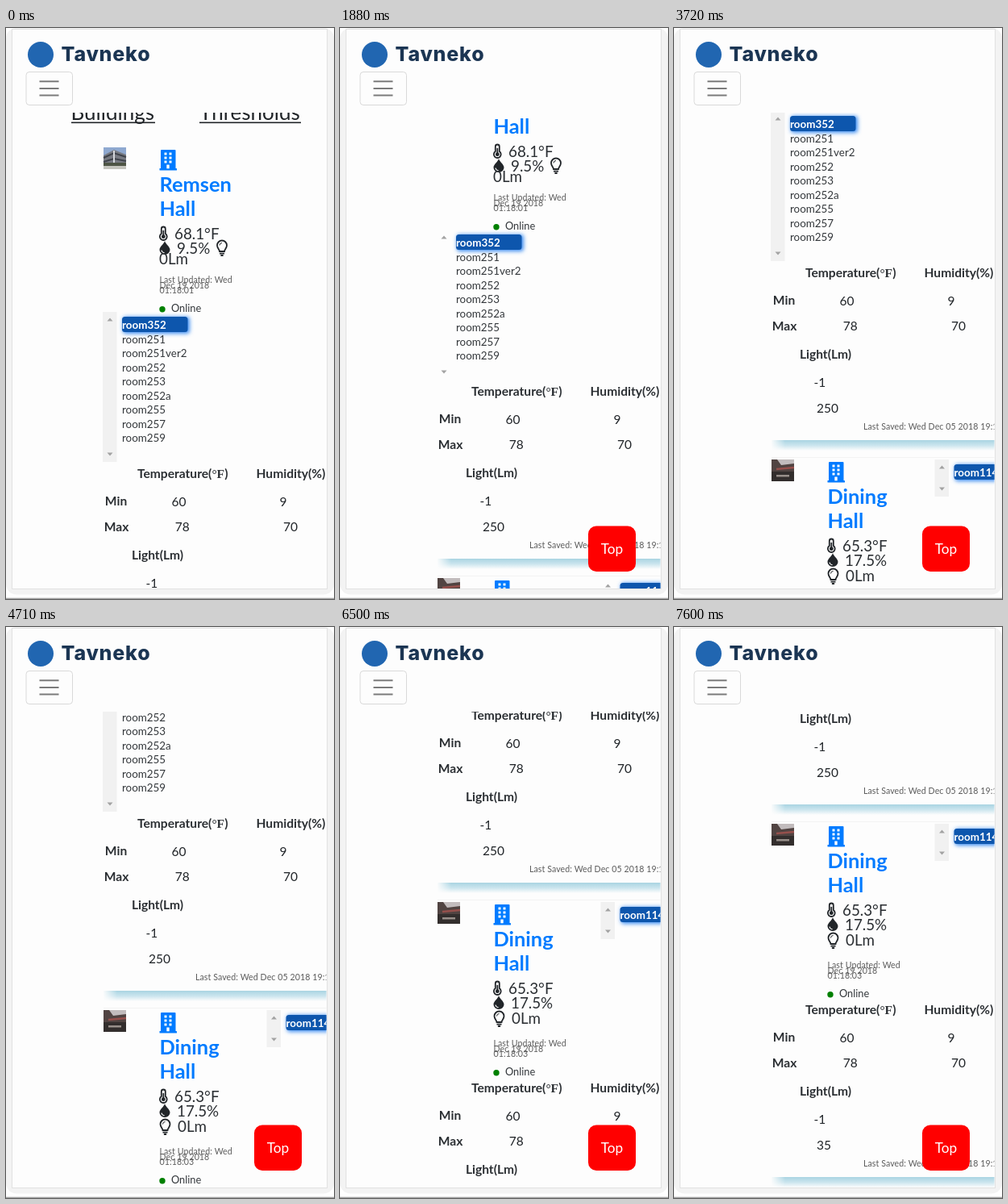
Animation, 407 px wide and 708 px high, one loop 8 s. Source, as an HTML page:

```html
<!DOCTYPE html>
<html lang="en">
<head>
<meta charset="utf-8">
<title>Building monitor</title>
<style>
  html, body { margin: 0; width: 100%; height: 100%; overflow: hidden; background: #fff; }
  svg { display: block; width: 100vw; height: 100vh; }
  text { font-family: Lato, sans-serif; font-size: 15.5px; fill: #212529; white-space: pre; }
  .b { font-weight: 700; font-size: 15.6px; fill: #2b2f33; }
  .mid { text-anchor: middle; }
  .head { font-size: 26px; }
  .title { font-size: 25.4px; font-weight: 700; fill: #007bff; }
  .read { font-size: 18.8px; fill: #2b2f33; }
  .note { font-size: 10.6px; letter-spacing: .08px; fill: #5c5c5c; }
  .state { font-size: 12.8px; fill: #33373b; }
  .opt { font-size: 13.4px; fill: #33373b; }
  .picked { font-weight: 700; fill: #fff; }
  .brand { font: 800 25px Inter, sans-serif; letter-spacing: .8px; fill: #1b3553; }
  .button { font-size: 17.2px; fill: #fff; }
  .serif { font-family: "Liberation Serif", serif; }
  .line { fill: none; stroke: #212529; stroke-width: 1.8; }
</style>
</head>
<body>
<svg id="stage" viewBox="0 0 407 708" preserveAspectRatio="none"></svg>
<script>
const LOOP = 8000;
const NOTCH = 41.5;

// One wheel notch each: start, end, and how far it has moved in between
const notches = [
  [500, 650, .45], [1210, 1350, .47], [1880, 2030, .45], [2460, 2590, .45],
  [2890, 3010, .45], [3720, 3720, 0], [4280, 4430, .45], [4710, 4860, .45],
  [5420, 5540, .22], [5940, 6070, .45], [6500, 6650, .67], [6930, 7060, .45],
  [7460, 7600, .45]
];

const rect = (x, y, w, h, fill, extra = '') =>
  `<rect x="${x}" y="${y}" width="${w}" height="${h}" fill="${fill}" ${extra}/>`;
const text = (x, y, str, cls = '') => `<text x="${x}" y="${y}" class="${cls}">${str}</text>`;
const path = (d, attrs) => `<path d="${d}" ${attrs}/>`;
const move = (x, y, body) => `<g transform="translate(${x} ${y})">${body}</g>`;

const buildingIcon = () => {
  let holes = '';
  for (const y of [154.5, 159.5, 164.5])
    for (const x of [196.5, 202.5]) holes += rect(x, y, 3, 3, '#fff');
  return rect(192, 151, 18.5, 24, '#007bff', 'rx="1"') +
    rect(190.5, 174, 21.5, 2.5, '#007bff', 'rx=".6"') +
    holes + rect(199.3, 169.5, 3.4, 4.8, '#fff');
};

const thermometer = () =>
  path('M192.8 255V249a2.5 2.5 0 0 1 5 0V255a4.4 4.4 0 1 1-5 0Z', 'class="line"') +
  path('M195.3 251V258', 'class="line"') +
  '<circle cx="195.3" cy="258.7" r="2.4" fill="#212529"/>';

const drop = () =>
  path('M197 264c1 4 6.5 7 6.5 11a6.5 6 0 0 1-13 0c0-4 5.5-7 6.5-11z', 'fill="#212529"') +
  path('M193 275.5a4 3.6 0 0 0 3.6 3.2', 'fill="none" stroke="#fff" stroke-width="1.1"');

const bulb = () =>
  path('M265 277c0-2.5-3-4-3-7.5a6 6 0 0 1 12 0c0 3.5-3 5-3 7.5z', 'class="line"') +
  path('M265 279.6h6M266.4 282h3.2', 'class="line"') +
  path('M265 269.5a3 3 0 0 1 3-3', 'class="line" style="stroke-width:1"');

const dayPhoto = () =>
  rect(121, 148, 28, 27, '#8fa9d0') +
  path('M121 158L134 151L149 157V169H121Z', 'fill="#777a82"') +
  path('M121 161L134 155L149 160M121 166L134 162L149 165', 'fill="none" stroke="#3f434b" stroke-width="2"') +
  path('M134 152V167', 'stroke="#d5d8dc" stroke-width="2"') +
  rect(121, 167, 28, 4, '#4e5545') + rect(121, 171, 28, 4, '#c4c4bd');

const duskPhoto = () =>
  rect(121, 148, 28, 27, '#c2bcbd') +
  path('M121 148H128L133 155L149 153V166H121Z', 'fill="#514442"') +
  path('M127 160L149 158', 'stroke="#96504c" stroke-width="2.5"') +
  rect(121, 163, 28, 12, '#332e2d') + rect(127, 167, 16, 2.5, '#988f8a');

const arrows = (x, top, bottom) =>
  path(`M${x - 3.5} ${top + 2}h7l-3.5-4zM${x - 3.5} ${bottom - 2}h7l-3.5 4z`, 'fill="#a3a3a3"');

const select = (x, y, h, w, options) => {
  const left = x + 24;
  const base = y + 21;
  return rect(x, y, 17.5, h, '#f1f1f1', 'class="track"') +
    arrows(x + 9, y + 9.5, y + h - 9.5) +
    rect(left + 1, y + 6, w + 1, 21, '#3f8ff2', 'rx="4" filter="url(#glow)"') +
    rect(left, y + 6, w - .5, 19, '#0d56ad', 'rx="3.5"') +
    options.map((o, i) =>
      text(left, Math.round(base + i * 17.5), o, i ? 'opt' : 'opt picked')).join('');
};

const rule = y =>
  rect(121, y, 290, 13, 'url(#fall)') + rect(120, y, 18, 13, 'url(#fade)') +
  rect(121, y + 21, 290, 1, '#f3f3f3');

const limits = light =>
  text(163, 557.5, 'Temperature(<tspan class="serif">°F</tspan>)', 'b') +
  text(310.5, 557.5, 'Humidity(%)', 'b') +
  text(136.5, 592, 'Min', 'b mid') + text(214.5, 593, '60', 'mid') + text(344, 593, '9', 'mid') +
  text(137, 624, 'Max', 'b mid') + text(218.7, 624, '78', 'mid') + text(353, 624, '70', 'mid') +
  text(188, 659, 'Light(Lm)', 'b mid') +
  text(173.5, 694, '-1') + text(177, 726, light) +
  text(235, 747, 'Last Saved: Wed Dec 05 2018 19:18:01', 'note') +
  rule(760);

const heading = (photo, name, temp, wet) =>
  photo() + buildingIcon() +
  text(190.5, 203, name, 'title') + text(190.5, 233, 'Hall', 'title') +
  thermometer() + text(209, 262, temp, 'read') +
  drop() + text(212, 280, wet, 'read');

const status = time =>
  text(190.5, 316, 'Last Updated: Wed', 'note') +
  text(190.5, 322.5, 'Dec 19 2018', 'note') +
  text(190.5, 328.5, time, 'note') +
  '<circle cx="194" cy="348.7" r="3.7" fill="#008000"/>' +
  text(205, 352, 'Online', 'state');

const rooms = ['352', '251', '251ver2', '252', '253', '252a', '255', '257', '259'].map(r => 'room' + r);

const page =
  text(80.5, 114, 'Buildings', 'head') + rect(81, 116.5, 104, 1.6, '#212529') +
  text(240, 114, 'Thresholds', 'head') + rect(240, 116.5, 126, 1.6, '#212529') +
  heading(dayPhoto, 'Remsen', '68.1°F', '9.5%') +
  bulb() + text(190, 293, '0Lm', 'read') +
  status('01:18:01') +
  select(120, 352, 186, 82, rooms) +
  limits('250') +
  move(0, 636, heading(duskPhoto, 'Dining', '65.3°F', '17.5%')) +
  move(-70.5, 656, bulb()) + text(213, 935, '0Lm', 'read') +
  move(0, 647, status('01:18:03')) +
  select(323.5, 784, 46, 82, ['room114']) +
  move(0, 462, limits('35'));

const defs = `<defs>
  <clipPath id="view"><rect x="9" y="105" width="388.5" height="590"/></clipPath>
  <filter id="glow" x="-20%" y="-60%" width="140%" height="220%"><feGaussianBlur stdDeviation="2.6"/></filter>
  <linearGradient id="fall" x2="0" y2="1"><stop stop-color="#a9d4e2"/><stop offset=".5" stop-color="#cbe5ee"/><stop offset="1" stop-color="#fdfdfd"/></linearGradient>
  <linearGradient id="fade"><stop stop-color="#fdfdfd"/><stop offset="1" stop-color="#fdfdfd" stop-opacity="0"/></linearGradient>
</defs>`;

const frame =
  rect(0, 0, 407, 702.5, '#f3f3f3', 'rx="13"') +
  rect(7.5, 1.5, 391, 694, '#fdfdfd', 'stroke="#e2e2e2"') +
  rect(0, 706.7, 407, 1.3, '#a2a2a2');

const header =
  '<circle cx="43" cy="33" r="16" fill="#2166b1"/>' +
  text(68.5, 41, 'Tavneko', 'brand') +
  rect(25, 54.5, 57.5, 41, '#fdfdfd', 'rx="4" stroke="#d9d9d9"') +
  path('M41.5 66.3h24M41.5 75h24M41.5 83.6h24', 'stroke="#7b7b7b" stroke-width="2"');

const topButton = '<g id="top">' +
  rect(308, 617.5, 59, 56.5, '#f00', 'rx="10"') +
  text(337.5, 652, 'Top', 'button mid') + '</g>';

const stage = document.getElementById('stage');
stage.innerHTML = defs + frame + header +
  `<g clip-path="url(#view)"><g id="page">${page}</g></g>` + topButton;

const pageEl = document.getElementById('page');
const topEl = document.getElementById('top');
const tracks = stage.querySelectorAll('.track');

function scrollAt(t) {
  let n = 0;
  notches.forEach(([start, end, part], i) => {
    if (t >= end) n = i + 1;
    else if (t >= start) n = i + part;
  });
  return Math.round(n * NOTCH);
}

function draw(t) {
  const y = scrollAt(t);
  pageEl.setAttribute('transform', `translate(0 ${-y})`);
  topEl.setAttribute('visibility', y > 8 ? 'visible' : 'hidden');
  const pale = y > 20 && y < 200;
  tracks.forEach(el => el.setAttribute('fill', pale ? '#fdfdfd' : '#f1f1f1'));
}

const began = performance.now();
function tick() {
  draw((performance.now() - began) % LOOP);
  requestAnimationFrame(tick);
}
tick();
</script>
</body>
</html>
```
